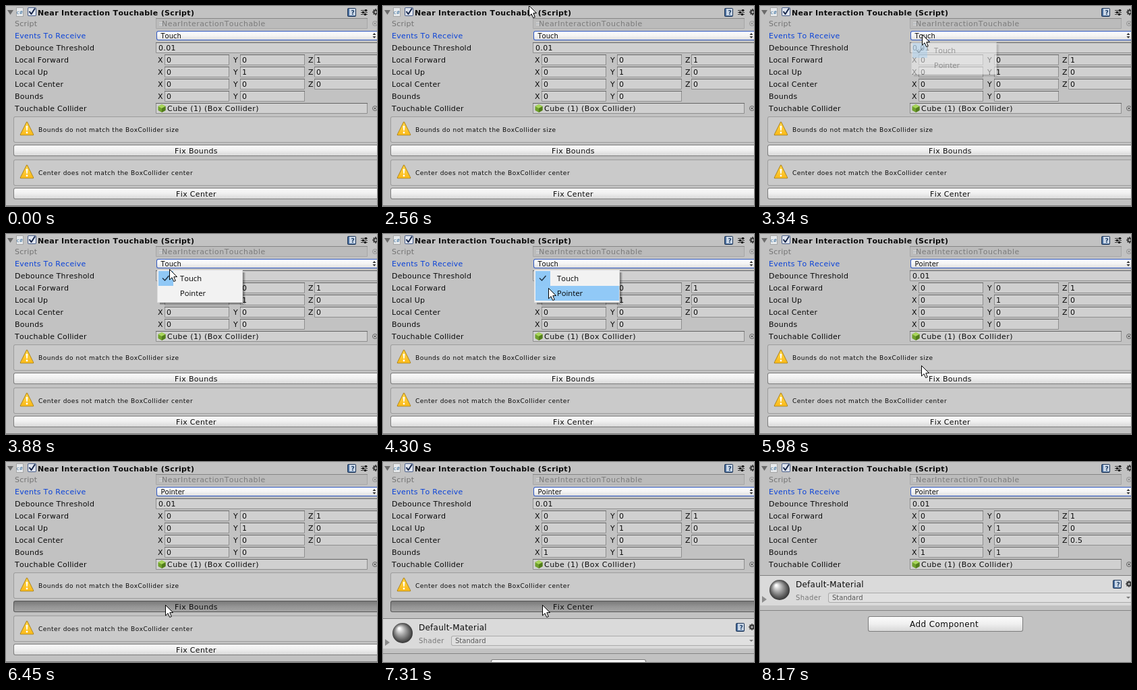
Recreate the animation shown at these times as an HTML page with a canvas. Size 550 px wide and 297 px high, loop 8.85 s.

```html
<!DOCTYPE html>
<html lang="en">
<head>
<meta charset="utf-8">
<title>Inspector panel</title>
<style>
html, body { margin: 0; width: 100%; height: 100%; overflow: hidden; background: #c2c2c2; }
canvas { display: block; }
</style>
</head>
<body>
<canvas id="stage" width="550" height="297"></canvas>
<script>
const c = document.getElementById('stage').getContext('2d');
const LOOP = 8850, BG = '#c2c2c2';
const SANS = '"DejaVu Sans", Verdana, sans-serif', MENU = '"Open Sans", sans-serif';

// Cursor moves: start, end, number of steps, target x, target y
const START = [213, -6];
const MOVES = [
  [2560, 3160, 10, 240, 42],
  [3640, 3640, 1, 241, 48],
  [3820, 4300, 8, 245, 80],
  [5150, 5270, 3, 247, 109],
  [5330, 6030, 13, 238, 202],
  [6090, 6390, 6, 236, 212],
  [7870, 8170, 6, 409, 316]
];

// Fraction done of a stepped change; the first step lands at its start time
function steps(t, start, end, n) {
  if (t < start) return 0;
  return Math.min(n, 1 + Math.floor((t - start) * (n - 1) / (end - start || 1) + 0.01)) / n;
}

function cursorAt(t) {
  let [x, y] = START;
  for (const [start, end, n, toX, toY] of MOVES) {
    const p = steps(t, start, end, n);
    x += (toX - x) * p;
    y += (toY - y) * p;
  }
  return [Math.round(x), Math.round(y)];
}

function text(s, x, y, { size = 11, gap = 0.25, color = '#0a0a0a', weight = '', family = SANS, align = 'left' } = {}) {
  c.font = `${weight} ${size}px ${family}`;
  c.letterSpacing = gap + 'px';
  c.fontKerning = 'none';
  c.textAlign = align;
  c.fillStyle = color;
  c.fillText(s, x, y);
}

function rect(x, y, w, h, fill) {
  c.fillStyle = fill;
  c.fillRect(x, y, w, h);
}

function box(x, y, w, h, fill, border, r = 0) {
  c.beginPath();
  c.roundRect(x, y, w, h, r);
  c.fillStyle = border;
  c.fill();
  c.beginPath();
  c.roundRect(x + 1, y + 1, w - 2, h - 2, Math.max(0, r - 1));
  c.fillStyle = fill;
  c.fill();
}

function poly(points, fill, stroke, width = 1) {
  c.beginPath();
  for (let i = 0; i < points.length; i += 2) c.lineTo(points[i], points[i + 1]);
  c.closePath();
  if (fill) { c.fillStyle = fill; c.fill(); }
  if (stroke) { c.strokeStyle = stroke; c.lineWidth = width; c.lineJoin = 'round'; c.stroke(); }
}

function line(points, color, width = 1) {
  c.beginPath();
  for (let i = 0; i < points.length; i += 2) c.lineTo(points[i], points[i + 1]);
  c.strokeStyle = color;
  c.lineWidth = width;
  c.stroke();
}

function disc(x, y, r, fill) {
  c.beginPath();
  c.arc(x, y, r, 0, 7);
  c.fillStyle = fill;
  c.fill();
}

function shade(y, h, ...colors) {
  const g = c.createLinearGradient(0, y, 0, y + h);
  colors.forEach((color, i) => g.addColorStop(i / (colors.length - 1), color));
  return g;
}

function field(x, y, w, value) {
  box(x, y, w, 16, '#d0d0d0', '#8e8e8e', 1);
  rect(x, y, w, 1, '#646464');
  if (value) text(value, x + 4, y + 12, { gap: 0.35 });
}

function vector(label, y, values) {
  text(label, 13, y + 4);
  values.forEach((v, i) => {
    const x = [235, 347, 457][i];
    text('XYZ'[i], [225, 337, 448][i], y + 4);
    field(x, y - 8, 96, '');
    text(v, x + 3, y + 4);
  });
}

function picker(y) {
  c.strokeStyle = '#666';
  c.lineWidth = 1;
  c.beginPath();
  c.arc(547, y, 3.5, 0, 7);
  c.stroke();
  disc(547, y, 1.3, '#555');
}

function book(x, y) {
  box(x - 6, y - 6, 13, 13, '#4a6f9e', '#1c3354', 2);
  rect(x - 3, y - 5, 9, 10, '#c9d6e6');
  text('?', x + 2, y + 4, { size: 9, gap: 0, weight: 'bold', color: '#1f3f68', align: 'center' });
}

function gear(x, y) {
  for (let i = 0; i < 4; i++) {
    const a = i * Math.PI / 4, dx = 4.7 * Math.cos(a), dy = 4.7 * Math.sin(a);
    line([x - dx, y - dy, x + dx, y + dy], '#3a3a3a', 2);
  }
  disc(x, y, 3.5, '#3a3a3a');
  disc(x, y, 1.6, BG);
}

function sliders(x, y) {
  [[-3, 2], [0, -2], [3, 1]].forEach(([dy, knob]) => {
    rect(x - 5, y + dy, 10, 1, '#3a3a3a');
    rect(x + knob - 1, y + dy - 1, 3, 3, '#222');
  });
}

function header() {
  poly([2, 6, 11, 6, 6.5, 13], '#6b6b6b');
  box(15, 2, 11, 14, '#e6e9ec', '#a4a4a4', 1);
  text('c#', 20.5, 12, { size: 7, gap: 0, color: '#3a6f9c', align: 'center' });
  box(32, 2, 13, 13, '#dfe4ee', '#4a5f8a', 2);
  line([34.5, 8, 37.5, 12, 43, 3.5], '#14264a', 2);
  text('Near Interaction Touchable (Script)', 47, 14, { weight: 'bold', gap: 0.35 });
  book(512, 9);
  sliders(531, 9);
  gear(548, 9);
}

function properties(mode, bounds, centerZ) {
  c.globalAlpha = 0.5;
  field(222, 18, 314, '');
  picker(26);
  rect(227, 24, 5, 5, '#e4e4e4');
  rect(227, 26, 5, 1, '#8a9aa8');
  c.globalAlpha = 1;
  text('Script', 13, 30, { color: '#737373' });
  text('NearInteractionTouchable', 239 - 8, 30, { gap: 0.45, color: '#7b7b7b' });

  text('Events To Receive', 13, 48, { color: '#0b43d8' });
  box(223, 37, 332, 14, shade(38, 12, '#fff', '#f4f4f4', '#e0e0e0'), '#2f58c2', 3);
  text(mode, 229.5, 47.5, { size: 10, gap: 0 });
  poly([543.5, 43, 548.5, 43, 546, 40], '#333');
  poly([543.5, 45, 548.5, 45, 546, 48], '#333');

  text('Debounce Threshold', 13, 66);
  field(222, 54, 340, '0.01');
  vector('Local Forward', 80, ['0', '0', '1']);
  vector('Local Up', 98, ['0', '1', '0']);
  vector('Local Center', 116, ['0', '0', centerZ]);
  vector('Bounds', 134, [bounds, bounds]);

  text('Touchable Collider', 13, 156);
  field(222, 144, 314, '');
  picker(152);
  poly([231, 146, 236.5, 149, 236.5, 155, 231, 158, 225.5, 155, 225.5, 149], '#6fa02c');
  poly([231, 146, 236.5, 149, 231, 152, 225.5, 149], '#a9d65c');
  poly([231, 152, 236.5, 149, 236.5, 155, 231, 158], '#527c1c');
  text('Cube (1) (Box Collider)', 239, 156, { gap: 0.45 });
}

function button(x, y, w, h, label, mid, pressed, style) {
  const fill = pressed ? shade(y, h, '#767676', '#949494', '#a6a6a6') : shade(y, h, '#fdfdfd', '#efefef', '#d6d6d6');
  box(x, y, w, h, fill, pressed ? '#555' : '#7c7c7c', 3);
  text(label, mid, y + h / 2 + 4, { align: 'center', gap: 0.35, ...style });
}

function warning(y, message, fix, pressed) {
  const sign = [31, y + 9, 40, y + 27, 22, y + 27];
  box(11, y, 550, 39, '#cacaca', '#9c9c9c', 3);
  poly(sign, null, '#a8801c', 2.5);
  poly(sign, shade(y + 8, 20, '#ffe05a', '#fbb612'), '#fcc52a', 0.8);
  poly([29.7, y + 14, 32.3, y + 14, 31.7, y + 21, 30.3, y + 21], '#fff');
  disc(31, y + 24, 1.4, '#fff');
  text(message, 48, y + 23, { size: 9, gap: 0.5 });
  button(11, y + 42, 550, 17, fix, 282, pressed);
}

function material(offset) {
  c.save();
  c.translate(0, offset);
  rect(0, 168, 550, 1, '#7e7e7e');
  rect(0, 169, 550, 44, '#dadada');
  const ball = c.createRadialGradient(24, 183, 1, 29, 190, 16);
  ball.addColorStop(0, '#fff');
  ball.addColorStop(0.4, '#a6a6a6');
  ball.addColorStop(1, '#2c2c2c');
  disc(29, 190, 15, ball);
  text('Default-Material', 53, 186, { size: 12 });
  book(529, 181);
  gear(547, 181);
  poly([3, 199, 10, 204, 3, 209], '#8c8c8c');
  text('Shader', 53, 205, { size: 10, gap: 0.4, color: '#777' });
  box(101, 194, 460, 15, '#e0e0e0', '#aaa', 3);
  text('Standard', 107, 205, { size: 10, gap: 0, color: '#555' });
  poly([543, 200, 549, 200, 546, 203], '#777');
  rect(0, 220, 550, 1, '#848484');
  button(160, 229, 230, 23, 'Add Component', 273, false, { size: 12, gap: 0.4 });
  c.restore();
}

function menuRow(i, hover) {
  const y = 55 + i * 22;
  if (hover) rect(226, y, 124, 22, '#91c9f7');
  if (i === 0) {
    rect(226, y, 22, 22, hover ? '#56b0fa' : '#90c8f6');
    line([232, 65.5, 235.5, 69, 241.5, 62], '#1b2a3a', 1.3);
  }
  text(['Touch', 'Pointer'][i], 258, y + 15, { size: 11.2, gap: 0, color: '#000', family: MENU });
}

function menu(alpha, hover) {
  c.globalAlpha = alpha;
  for (let i = 0; i < 4; i++) {
    const dark = `rgba(0,0,0,${0.4 - i * 0.1})`;
    rect(351 + i, 57, 1, 45 + i, dark);
    if (i < 3) rect(228, 102 + i, 123 + i, 1, dark);
  }
  box(224, 53, 127, 49, '#f2f2f2', '#dedede');
  menuRow(0, hover === 0);
  menuRow(1, hover === 1);
  c.globalAlpha = 1;
}

function cursor(x, y, beam) {
  if (beam) {
    rect(x, y - 6, 1, 13, '#222');
    for (const dy of [-7, 7]) {
      rect(x - 3, y + dy, 3, 1, '#222');
      rect(x + 1, y + dy, 3, 1, '#222');
    }
    return;
  }
  c.save();
  c.translate(x + 0.5, y + 0.5);
  poly([0, 0, 0, 15.5, 3.6, 12.2, 6.2, 18, 8.8, 17, 6.3, 11.2, 11, 11], '#fff', '#000');
  c.restore();
}

function draw(t) {
  const picked = t >= 4670, boundsFixed = t >= 6510, centerFixed = t >= 7370;
  const [x, y] = cursorAt(t);
  rect(0, 0, 550, 297, BG);
  header();
  properties(picked ? 'Pointer' : 'Touch', boundsFixed ? '1' : '0', centerFixed ? '0.5' : '0');

  let top = 164;
  if (!boundsFixed) {
    warning(top, 'Bounds do not match the BoxCollider size', 'Fix Bounds', t >= 6450);
    top += 64;
  }
  if (!centerFixed) {
    warning(top, 'Center does not match the BoxCollider center', 'Fix Center', t >= 7310);
    top += 64;
  }
  material(top - 164);

  if (t >= 3340 && !picked) {
    menu([0, 0.35, 0.7, 1][Math.round(3 * steps(t, 3340, 3450, 3))], y < 55 ? -1 : y < 77 ? 0 : 1);
  } else if (picked && t < 4970) {
    c.globalAlpha = 1 - steps(t, 4670, 4970, 6);
    menuRow(1, true);
    c.globalAlpha = 1;
  }
  if (t >= 2560 && t < 8170) cursor(x, y, picked && y < 142);
}

function frame() {
  draw(performance.now() % LOOP);
  requestAnimationFrame(frame);
}
frame();
</script>
</body>
</html>
```
